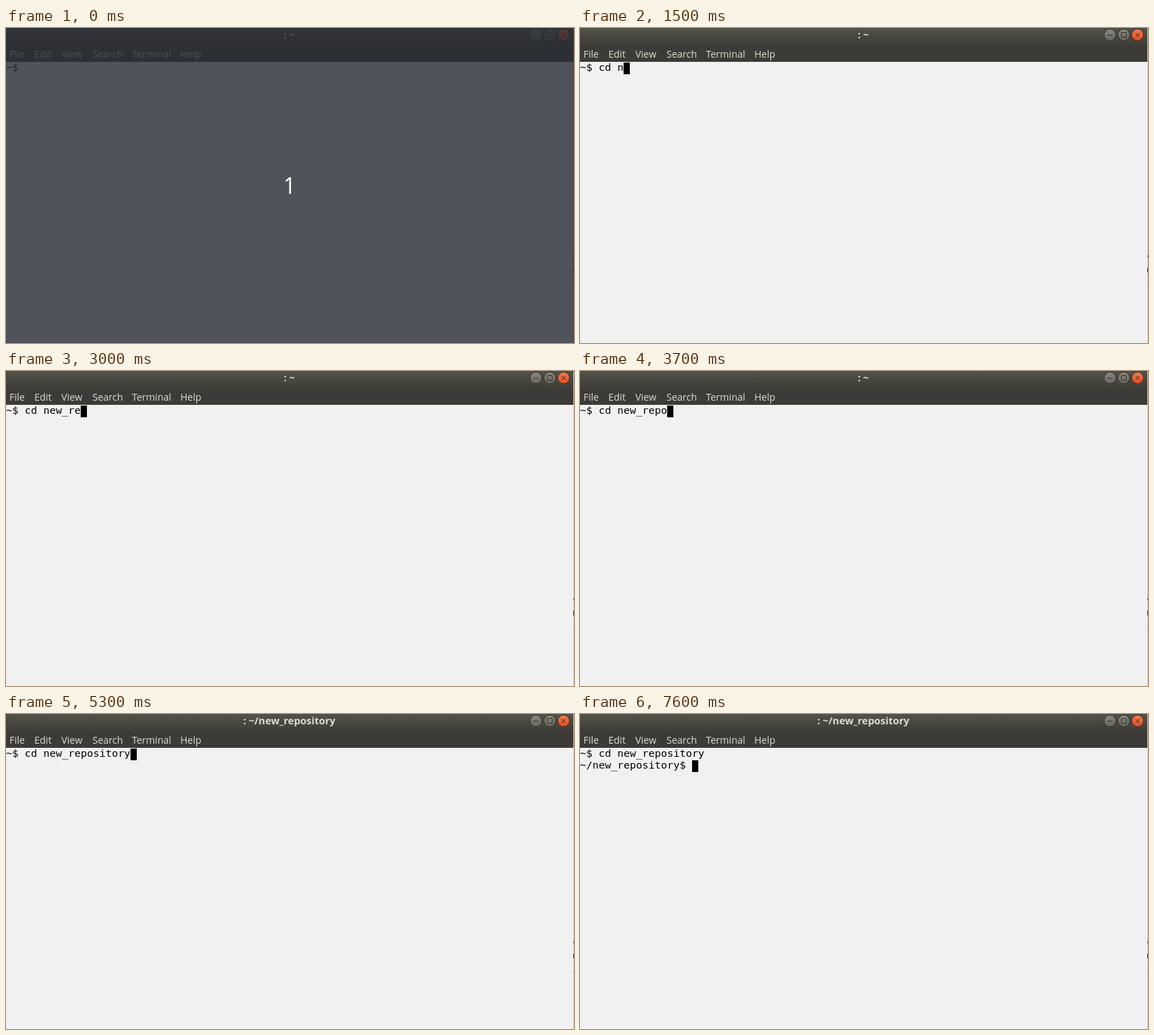
Animation, 821 px wide and 456 px high, one loop 8000 ms. Source, as an HTML page:

```html
<!DOCTYPE html>
<html lang="en">
<head>
<meta charset="utf-8">
<title>Terminal</title>
<style>
  html, body { margin: 0; width: 100%; height: 100%; overflow: hidden; background: #f1f1f1; }
  svg { display: block; width: 100vw; height: 100vh; }
  text { white-space: pre; }
  .ui { font: 14px "Open Sans", "Noto Sans", sans-serif; fill: #dfdbd2; }
  #title { font-size: 14.5px; font-weight: 700; text-anchor: middle; }
  .mono { font: 14.95px "DejaVu Sans Mono", "Noto Sans Mono", monospace; fill: #000; }
  #count { font: 500 32px "Open Sans", "Noto Sans", sans-serif; fill: #fff; text-anchor: middle; }
  .button { stroke: #2f2e2a; stroke-width: 1; }
  .icon { fill: none; stroke: #33322e; stroke-width: 1; }
</style>
</head>
<body>
<svg viewBox="0 0 821 456">
  <defs>
    <linearGradient id="bar" x2="0" y2="1">
      <stop offset="0" stop-color="#545349"/>
      <stop offset="1" stop-color="#3e3d37"/>
    </linearGradient>
    <linearGradient id="grey" x2="0" y2="1">
      <stop offset="0" stop-color="#8a887f"/>
      <stop offset="1" stop-color="#66645d"/>
    </linearGradient>
    <linearGradient id="orange" x2="0" y2="1">
      <stop offset="0" stop-color="#f47d56"/>
      <stop offset="1" stop-color="#e4491c"/>
    </linearGradient>
  </defs>

  <rect width="821" height="456" fill="#f1f1f1"/>
  <rect width="820" height="49" fill="#3c3b37"/>
  <rect width="820" height="25" fill="url(#bar)"/>

  <!-- sliver of the desktop beside the window -->
  <rect x="820" width="1" height="456" fill="#c9c9c9"/>
  <rect x="820" y="329" width="1" height="3" fill="#444"/>
  <rect x="820" y="347" width="1" height="7" fill="#222"/>
  <rect x="820" y="370" width="1" height="5" fill="#e2a06a"/>

  <text id="title" class="ui" x="409.5" y="15"></text>
  <g id="menu" class="ui"></g>

  <circle class="button" cx="766" cy="10" r="8.5" fill="url(#grey)"/>
  <circle class="button" cx="786" cy="10" r="8.5" fill="url(#grey)"/>
  <circle class="button" cx="806" cy="10" r="8.5" fill="url(#orange)"/>
  <path class="icon" d="M762 10.5h8M782.5 6.5h7v7h-7zM803 7l6 6m0-6l-6 6"/>

  <text id="line1" class="mono" x="0" y="62"></text>
  <text id="line2" class="mono" x="0" y="79"></text>
  <rect id="cursor" width="9" height="17"/>

  <g id="countdown">
    <rect width="821" height="456" fill="#282c34" fill-opacity=".8"/>
    <text id="count" x="410" y="239.5">1</text>
  </g>
</svg>
<script>
const LOOP = 8000, CELL = 9, ROW = 17, TOP = 50;
const START = 400, TITLE_AT = 5300, ENTER_AT = 5500;
const folder = "new_repository";
const command = "cd " + folder;
const prompts = ["~$ ", `~/${folder}$ `];

// [time, characters typed so far]
const keys = [[500, 1], [700, 3], [1500, 4], [1600, 6], [2200, 7], [2600, 8],
  [3000, 9], [3400, 10], [3700, 11], [3900, 12], [4000, 13], [4400, 15],
  [4800, 16], [5000, 17]];
const cursorOff = [[0, START], [5800, 6400], [7500, 7600]];

const el = id => document.getElementById(id);
const show = (id, on) => el(id).setAttribute("visibility", on ? "visible" : "hidden");

const menu = { File: 5, Edit: 41, View: 80, Search: 125, Terminal: 182, Help: 252 };
el("menu").innerHTML = Object.entries(menu)
  .map(([label, x]) => `<text x="${x}" y="43">${label}</text>`).join("");

function draw(t) {
  const typed = keys.reduce((n, [time, count]) => t >= time ? count : n, 0);
  const row = t >= ENTER_AT ? 1 : 0;
  const lines = [prompts[0] + command.slice(0, typed), row ? prompts[1] : ""];

  el("title").textContent = t >= TITLE_AT ? ": ~/" + folder : ": ~";
  el("line1").textContent = lines[0];
  el("line2").textContent = lines[1];
  el("cursor").setAttribute("x", lines[row].length * CELL);
  el("cursor").setAttribute("y", TOP + row * ROW);
  show("cursor", !cursorOff.some(([from, to]) => t >= from && t < to));
  show("countdown", t < START);
}

const begin = performance.now();
function frame() {
  draw((performance.now() - begin) % LOOP);
  requestAnimationFrame(frame);
}
frame();
</script>
</body>
</html>
```
